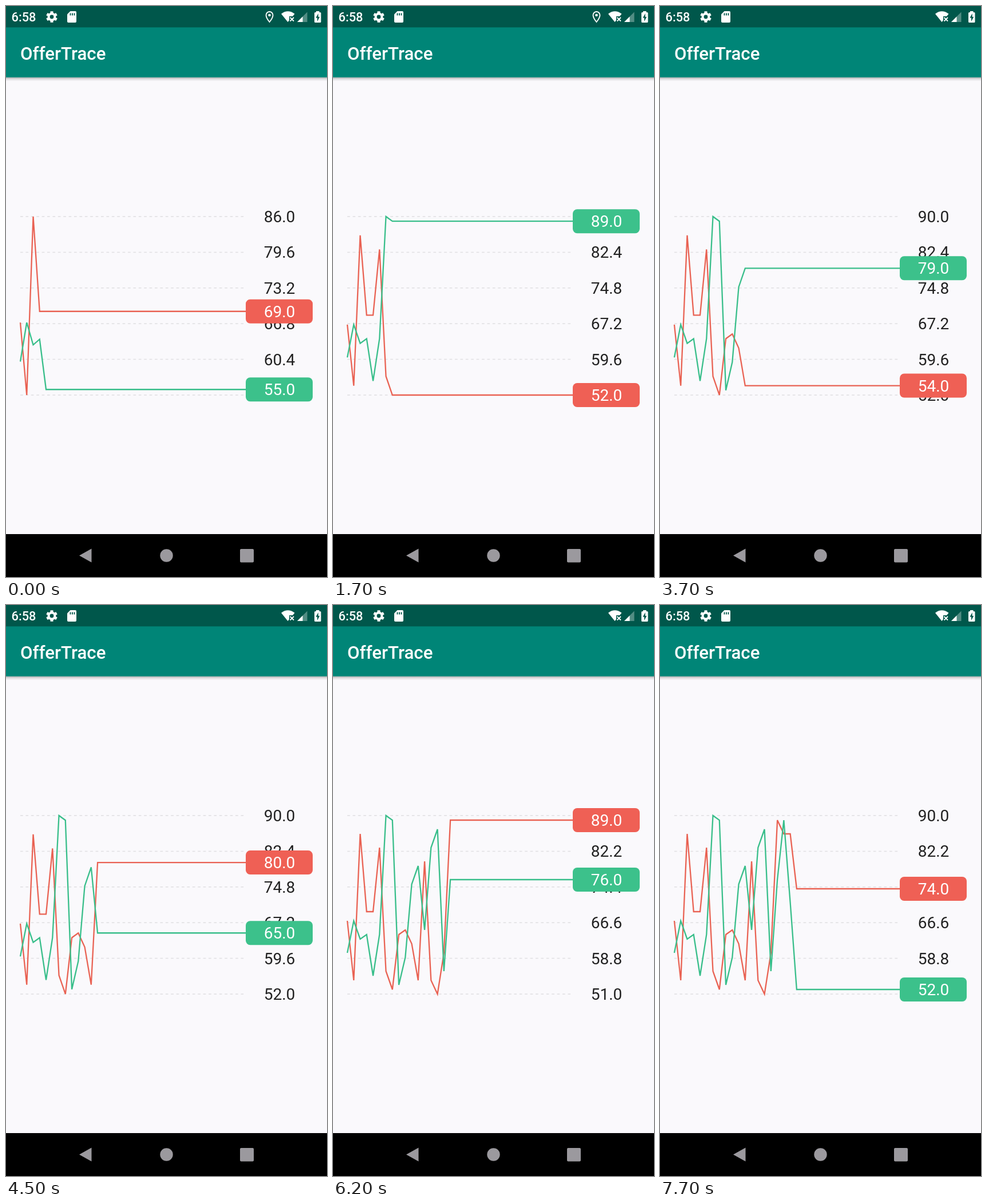
An HTML page for the animation above (8000 ms loop, 561 by 998 pixels).

```html
<!DOCTYPE html>
<html lang="en">
<head>
<meta charset="utf-8">
<title>Line chart</title>
<style>
  html, body { margin: 0; width: 100%; height: 100%; overflow: hidden; background: #faf9fc; }
  svg { display: block; width: 561px; height: 998px; font-family: Roboto, sans-serif; }
  .axis { font-size: 28.05px; text-anchor: middle; fill: #212121; }
  .tag text { fill: #fff; }
  .line { fill: none; stroke-width: 2.3; stroke-miterlimit: 4; }
  .dash { stroke: #e0dfe2; stroke-width: 1.5; stroke-dasharray: 4.7 4.7; }
</style>
</head>
<body>
<svg viewBox="0 0 561 998">
  <defs>
    <linearGradient id="shade" x2="0" y2="1">
      <stop offset="0" stop-color="#000" stop-opacity=".34"/>
      <stop offset=".4" stop-color="#000" stop-opacity=".12"/>
      <stop offset="1" stop-color="#000" stop-opacity="0"/>
    </linearGradient>
  </defs>
  <rect width="561" height="998" fill="#faf9fc"/>
  <rect y="124.5" width="561" height="7" fill="url(#shade)"/>
  <rect y="37" width="561" height="87.7" fill="#008577"/>
  <rect width="561" height="37.4" fill="#00574b"/>
  <text x="25" y="94" font-size="31.2" font-weight="500" fill="#fff">OfferTrace</text>

  <g fill="#fff">
    <text x="9.5" y="27.3" font-size="21.8" font-weight="500">6:58</text>
    <g transform="translate(80 19)">
      <circle r="7.4"/>
      <path id="teeth" d="M0-9.8V9.8M-8.5-4.9 8.5 4.9M-8.5 4.9 8.5-4.9" stroke="#fff" stroke-width="5"/>
      <circle r="3.4" fill="#00574b"/>
    </g>
    <path d="M112.5 9H121q2 0 2 2V27q0 2-2 2H109q-2 0-2-2V14.500Z"/>
    <path d="M112.5 12.500v4M116 12.500v4M119.500 12.500v4" stroke="#00574b" stroke-width="1.8"/>
    <g id="pin">
      <path d="M460.500 28C456.500 23 454.500 19.500 454.500 16a6 6 0 0 1 12 0C466.500 19.500 464.500 23 460.500 28Z" fill="none" stroke="#fff" stroke-width="1.8"/>
      <circle cx="460.500" cy="16" r="2.300"/>
    </g>
    <path d="M492.500 28 481 13.700Q492.500 5 504.500 13.700L501 18H495V25Z"/>
    <path d="M496.500 20 503 26.500M503 20 496.500 26.500" stroke="#fff" stroke-width="1.800"/>
    <path d="M509 28 526.500 10.500V28Z" opacity=".32"/>
    <path d="M509 28 518.500 18.500V28Z"/>
    <path d="M542 9h5.500v2H549q1.500 0 1.500 1.500V27.500q0 1.500-1.500 1.500H540.500q-1.500 0-1.500-1.500V12.500q0-1.500 1.500-1.500H542Z"/>
    <path d="M545.700 13 541.500 20.700H544V27L548.200 19H545.700Z" fill="#00574b"/>
  </g>

  <g id="chart"></g>

  <rect y="923" width="561" height="75" fill="#000"/>
  <g fill="#9b999e">
    <path d="M128 960.500 149.500 948.500V972.500Z"/>
    <circle cx="280.500" cy="960.500" r="11.200"/>
    <rect x="409" y="949" width="24" height="23.500" rx="2"/>
  </g>
</svg>
<script>
const LOOP = 8000, LEFT = 25, RIGHT = 419, TOP = 368, BOTTOM = 680, ROWS = 5;
const STEP_X = (RIGHT - LEFT) / 35;

const series = [
  { line: '#e96253', tag: '#ef6055',
    data: [67, 54, 86, 69, 69, 83, 56, 52, 64, 65, 62, 54, 80, 54, 51, 60, 89, 86, 86, 74] },
  { line: '#38be8a', tag: '#3cc18b',
    data: [60, 67, 63, 64, 55, 64, 90, 89, 53, 59, 75, 79, 65, 83, 87, 56, 76, 89, 71, 52] }
];

// [start ms, number of points]
const steps = [[0, 5], [700, 6], [1200, 7], [1700, 8], [2200, 9], [2700, 10]];
for (let n = 12; n <= 20; n++) steps.push([3700 + (n - 12) * 500, n]);

const chart = document.getElementById('chart');
const pin = document.getElementById('pin');

function add(parent, name, attrs) {
  const el = document.createElementNS('http://www.w3.org/2000/svg', name);
  for (const key in attrs) el.setAttribute(key, attrs[key]);
  return parent.appendChild(el);
}

const labels = [];
for (let i = 0; i <= ROWS; i++) {
  const y = TOP + (BOTTOM - TOP) * i / ROWS;
  add(chart, 'path', { class: 'dash', d: `M${LEFT} ${y}H${RIGHT}` });
  labels.push(add(chart, 'text', { class: 'axis', x: 478, y: y + 10 }));
}
for (const s of series) s.path = add(chart, 'path', { class: 'line', stroke: s.line });
for (const s of series) {
  s.group = add(chart, 'g', { class: 'tag' });
  add(s.group, 'rect', { x: 419, y: -21, width: 117, height: 42, rx: 7.8, fill: s.tag });
  s.text = add(s.group, 'text', { class: 'axis', x: 478, y: 10 });
}

function draw(count) {
  const seen = series.flatMap(s => s.data.slice(0, count));
  const max = Math.max(...seen), min = Math.min(...seen);
  const toY = v => TOP + (max - v) / (max - min) * (BOTTOM - TOP);

  labels.forEach((el, i) => el.textContent = (max - (max - min) * i / ROWS).toFixed(1));
  for (const s of series) {
    const points = s.data.slice(0, count).map((v, i) => `${LEFT + i * STEP_X} ${toY(v)}`);
    const last = s.data[count - 1];
    s.path.setAttribute('d', `M${points.join('L')}H${RIGHT}`);
    s.group.setAttribute('transform', `translate(0 ${toY(last)})`);
    s.text.textContent = last.toFixed(1);
  }
}

const start = performance.now();
let shown = 0;
function tick() {
  const t = (performance.now() - start) % LOOP;
  const count = steps.filter(([at]) => at <= t).pop()[1];
  if (count !== shown) draw(shown = count);
  pin.style.display = t < 2800 ? '' : 'none';
  requestAnimationFrame(tick);
}
tick();
</script>
</body>
</html>
```
